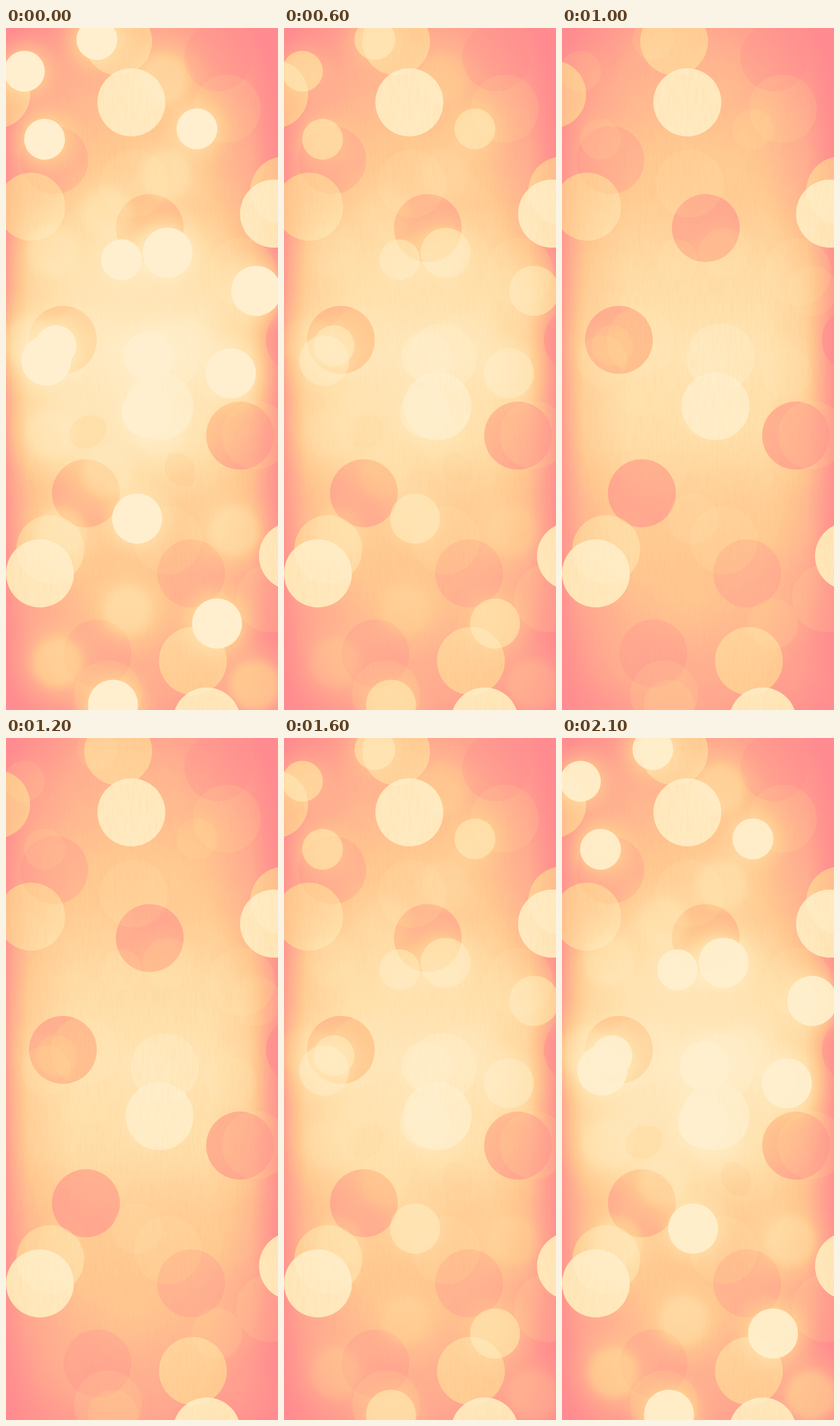
An HTML page for the animation above (2.2 s loop, 473 by 1183 pixels).

```html
<!DOCTYPE html>
<html lang="en">
<head>
<meta charset="utf-8">
<title>Bokeh lights</title>
<style>
  html, body { margin: 0; width: 100%; height: 100%; overflow: hidden; background: #ff8b90; }
  svg { display: block; width: 100%; height: 100%; }
  path { fill: none; stroke: #fff; stroke-linecap: round; }
  .disc { stroke-width: 118; }
  .dark { stroke: #000; }
  .small { stroke-width: 71; }
  .large { stroke-width: 87; }
  .lens { fill: #000; fill-opacity: .1; stroke: none; }
  #lights > * { animation: glow 2200ms infinite; }
  @keyframes glow {
    0%, 100% { opacity: 1; animation-timing-function: steps(11, end); }
    50% { opacity: 0; animation-timing-function: steps(11, end); }
  }
</style>
</head>
<body>
<svg viewBox="0 0 473 1183" preserveAspectRatio="none">
  <defs>
    <!-- Everything is painted in grey, then mapped from pink through orange to cream. -->
    <filter id="palette" filterUnits="userSpaceOnUse" x="0" y="0" width="473" height="1183" color-interpolation-filters="sRGB">
      <feComponentTransfer>
        <feFuncR type="table" tableValues="1 1"/>
        <feFuncG type="table" tableValues=".545 .667 .788 .878 .941"/>
        <feFuncB type="table" tableValues=".565 .561 .565 .667 .808"/>
      </feComponentTransfer>
    </filter>
    <filter id="grain" filterUnits="userSpaceOnUse" x="0" y="0" width="473" height="1183" color-interpolation-filters="sRGB">
      <feTurbulence type="fractalNoise" baseFrequency=".25 .03" numOctaves="3" seed="7"/>
      <feColorMatrix values="0 0 0 0 0  0 0 0 0 0  0 0 0 0 0  .16 0 0 0 -.06"/>
    </filter>
    <filter id="blur" filterUnits="userSpaceOnUse" x="-100" y="-100" width="673" height="1383">
      <feGaussianBlur stdDeviation="7"/>
    </filter>
    <filter id="halo" filterUnits="userSpaceOnUse" x="-100" y="-100" width="673" height="1383">
      <feGaussianBlur stdDeviation="18"/>
    </filter>
    <linearGradient id="wash" x2="0" y2="1">
      <stop offset="0" stop-color="#fff" stop-opacity=".43"/>
      <stop offset=".25" stop-color="#fff" stop-opacity=".54"/>
      <stop offset=".36" stop-color="#fff" stop-opacity=".71"/>
      <stop offset=".47" stop-color="#fff" stop-opacity=".81"/>
      <stop offset=".6" stop-color="#fff" stop-opacity=".74"/>
      <stop offset=".7" stop-color="#fff" stop-opacity=".56"/>
      <stop offset="1" stop-color="#fff" stop-opacity=".35"/>
    </linearGradient>
    <linearGradient id="sides">
      <stop offset="0" stop-opacity=".78"/>
      <stop offset=".03" stop-opacity=".52"/>
      <stop offset=".08" stop-opacity=".25"/>
      <stop offset=".25" stop-opacity="0"/>
      <stop offset=".75" stop-opacity="0"/>
      <stop offset=".9" stop-opacity=".22"/>
      <stop offset=".945" stop-opacity=".5"/>
      <stop offset="1" stop-opacity=".88"/>
    </linearGradient>
    <radialGradient id="corners" gradientUnits="userSpaceOnUse" cx="0" cy="0" r="1.1" gradientTransform="translate(225 600) scale(330 680)">
      <stop offset=".53" stop-opacity="0"/>
      <stop offset=".77" stop-opacity=".35"/>
      <stop offset="1" stop-opacity="1"/>
    </radialGradient>
    <radialGradient id="core">
      <stop offset="0" stop-color="#fff" stop-opacity=".6"/>
      <stop offset=".5" stop-color="#fff" stop-opacity=".35"/>
      <stop offset="1" stop-color="#fff" stop-opacity="0"/>
    </radialGradient>
    <!-- Each zero-length stroke with round caps is one lamp. -->
    <path id="small" d="M32 75h.01M158 20h.01M67 193h.01M332 175h.01M201 402h.01M87 551h.01"/>
    <path id="large" d="M281 390h.01M435 456h.01M70 577h.01M391 599h.01M228 851h.01M367 1033h.01M186 1174h.01M245 667h.01M248 570h.01"/>
  </defs>
  <g filter="url(#palette)">
    <rect width="473" height="1183"/>
    <rect width="473" height="1183" fill="url(#wash)"/>
    <rect width="473" height="1183" fill="url(#sides)"/>
    <rect width="473" height="1183" fill="url(#corners)"/>

    <g class="disc">
      <path class="dark" stroke-opacity=".3" d="M369 51h.01M84 229h.01M322 946h.01M159 1085h.01"/>
      <path class="dark" stroke-opacity=".58" d="M250 347h.01M99 541h.01M511 541h.01M407 707h.01M139 807h.01"/>
      <path stroke-opacity=".4" d="M195 23h.01M-17 115h.01M44 310h.01M484 282h.01M276 571h.01M77 904h.01M325 1098h.01"/>
      <path stroke-opacity=".84" d="M218 129h.01M466 322h.01M267 656h.01M59 946h.01M499 916h.01M349 1203h.01"/>
      <path id="faint" stroke-opacity=".1"/>
    </g>
    <rect width="473" height="1183" filter="url(#grain)"/>

    <g id="lights">
      <ellipse cx="215" cy="570" rx="270" ry="290" fill="url(#core)"/>
      <path class="mist" stroke-width="130" stroke-opacity=".22" filter="url(#halo)"/>
      <path class="mist" stroke-width="87" stroke-opacity=".28" filter="url(#blur)"/>
      <use href="#small" stroke-width="90" stroke-opacity=".5" filter="url(#halo)"/>
      <use href="#large" stroke-width="106" stroke-opacity=".5" filter="url(#halo)"/>
      <path class="lens" d="M111 717A36 36 0 0 1 173 684A36 36 0 0 1 111 717"/>
      <path class="lens" d="M284 737A36 36 0 0 1 322 794A36 36 0 0 1 284 737"/>
      <use class="small" href="#small"/>
      <use class="large" href="#large"/>
    </g>
  </g>
</svg>
<script>
  const dot = (x, y) => `M${x} ${y}h.01`;
  const repeat = (count, make) => Array.from({ length: count }, (_, i) => make(i)).join('');

  // Faint discs fall in two columns: a leaning one on the right, a swaying one on the left.
  const rightColumn = repeat(4, i => dot(384 + 25 * i, 140 + 283 * i));
  const leftColumn = repeat(4, i => {
    const sway = Math.sin(.2 + 4 * i);
    return dot(206 + 80 * sway, 265 + 300 * i + 25 * sway);
  });
  document.getElementById('faint').setAttribute('d', rightColumn + leftColumn);

  // Soft lights circle the bright middle, with a few more above and below.
  const ring = repeat(8, i => {
    const angle = i * Math.PI / 4;
    return dot(175 + 135 * Math.cos(angle), 545 + 225 * Math.sin(angle));
  });
  const outer = dot(274, 88) + dot(278, 256) + dot(95, 875) + dot(398, 872)
    + dot(211, 1011) + dot(89, 1101) + dot(433, 1140);
  for (const mist of document.querySelectorAll('.mist')) mist.setAttribute('d', ring + outer);
</script>
</body>
</html>
```
